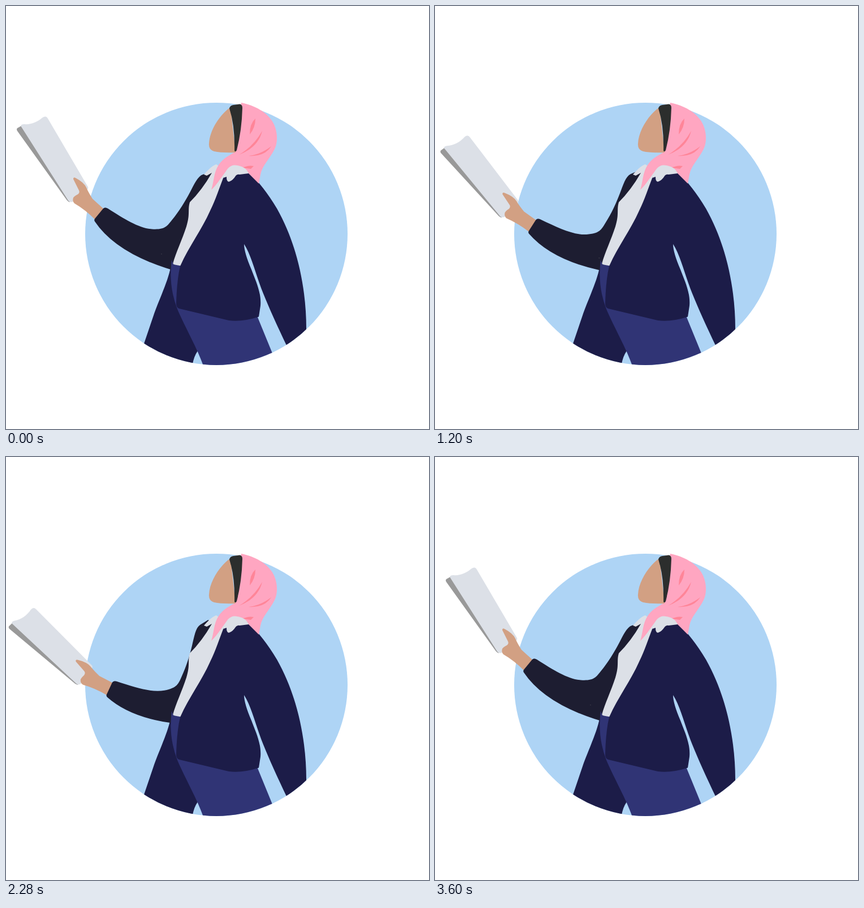
These frames come from a looping animation (748 px wide and 748 px high, 3.63 s). An HTML page:

```html
<!DOCTYPE html>
<html>
<head>
<meta charset="utf-8">
<style>
  html, body { margin: 0; width: 100%; height: 100%; overflow: hidden; background: #fff; }
  svg { display: block; width: 100vw; height: 100vh; }
  .navy { fill: #1c1c48; }
  .white { fill: #dce0e7; }
  .skin { fill: #d2a083; }
</style>
</head>
<body>
<svg viewBox="0 0 748 748">
  <clipPath id="disc"><circle cx="372" cy="403" r="232"/></clipPath>
  <circle cx="372" cy="403" r="232" fill="#aed4f5"/>

  <!-- back leg -->
  <path class="navy" clip-path="url(#disc)" d="M291 462C287 486 269 523 261 547L243 600V640H329Q331 621 339 610L304 470Z"/>

  <g id="arm">
    <path fill="#999" d="M20 216L27 212L113 347Q109 346 106 341L20 221Q18 218 20 216Z"/>
    <path class="white" d="M26 212Q27 209 32 209C44 210 56 205 65 197Q71 193 74 199L145 320Q146 323 143 325L118 346Q113 348 110 344Z"/>
    <path class="skin" d="M119 306Q119 302 123 304Q138 312 142 321T153 341L174 360L158 378Q140 360 121 349Q117 345 119 339Q121 336 127 333Q131 330 129 326Z"/>
    <path fill="#1d1d31" d="M172 358Q175 355 180 358C210 377 235 393 258 394.500S285 389 293 379C307 362 317 345 325 330S339 301 348 298L364 293L372 305L312 472Q198 442 157 381Q155 378 158 375Z"/>
    <circle cx="275" cy="438.500" r=".8" fill="#45454f"/>
  </g>

  <!-- shirt, trousers, coat -->
  <path class="white" d="M350 298Q364 282 372 280L400 300L380 400L320 470L295 456C300 437 312 412 319 390S321 360 325 347Q347 325 364 295L355 300Z"/>
  <g clip-path="url(#disc)">
    <path fill="#303475" d="M293 449L296 457L312 460L444 548L471 614V640H350C342 612 317 569 303 536Q287 495 293 449Z"/>
    <path class="navy" d="M385 302C377 322 371 342 361 362C346 396 324 424 308 460Q302 485 301 526Q301 533 306 535L394 556Q418 559 447 549.500L450 530C452 508 442 487 434 466Q421 436 421 421C432 438 439 464 448 490S476 558 496 600V640H531V570C531 505 517 425 479 358Q455 318 430 295L405 290Z"/>
  </g>

  <!-- headscarf and collar -->
  <path fill="#ffa6c1" d="M416 171C441 176 461 188 471 204S481 241 475 253C466 271 453 282 450 298L447 314L429 296L400 283C387 289 378 312 363 325C368 309 367 295 376 281S399 263 406 257L411 200Z"/>
  <g fill="#ff8598">
    <path d="M441 199Q431 208 431 227Q441 215 441 199Z"/>
    <path d="M453 221Q438 248 412 263Q446 250 453 221Z"/>
    <path d="M469 248Q450 263 429 265Q457 267 469 248Z"/>
    <path d="M419 286Q428 281 438 283L433 288Z"/>
  </g>
  <path class="white" d="M384 304Q391 281 405 281.500Q424 283 429 296L413 298Q408 297 405 302T396 310T390 302Z"/>

  <!-- head -->
  <path class="skin" d="M397 179C378 192 360 220 359 243Q358 254 368 257Q382 260 406 259Z"/>
  <path fill="#2c2e2d" d="M395 181Q396 176 402 175L413 173.500Q418 174 418 180Q417 220 408 255Q406 259 404 256Q405 212 395 181Z"/>
</svg>
<script>
const arm = document.getElementById('arm');
const LOOP = 3630, HOLD = 600, HALF_SWING = 7.4;

const progress = (x, from, to) => Math.min(1, Math.max(0, (x - from) / (to - from)));
const easeOut = u => 1 - (1 - u) ** 2.2;
const easeInOut = u => u * u * (3 - 2 * u);
const easeIn = u => u ** 1.8;

// Lower the arm in two moves, then raise it again
const swing = step => HALF_SWING * (
  easeOut(progress(step, -1, 24)) +
  easeInOut(progress(step, 27, 50)) -
  2 * easeIn(progress(step, 56, 84))
);

// A new pose every 36 ms, shown on a 30 ms clock
function stepAt(ms) {
  if (ms < HOLD) return -1;
  const tick = Math.floor((ms - HOLD) / 30);
  return Math.ceil((tick + 1) * 30 / 36) - 1;
}

function draw() {
  const angle = swing(stepAt(performance.now() % LOOP));
  arm.setAttribute('transform', `rotate(${-angle} 341 316)`);
  requestAnimationFrame(draw);
}
draw();
</script>
</body>
</html>
```
